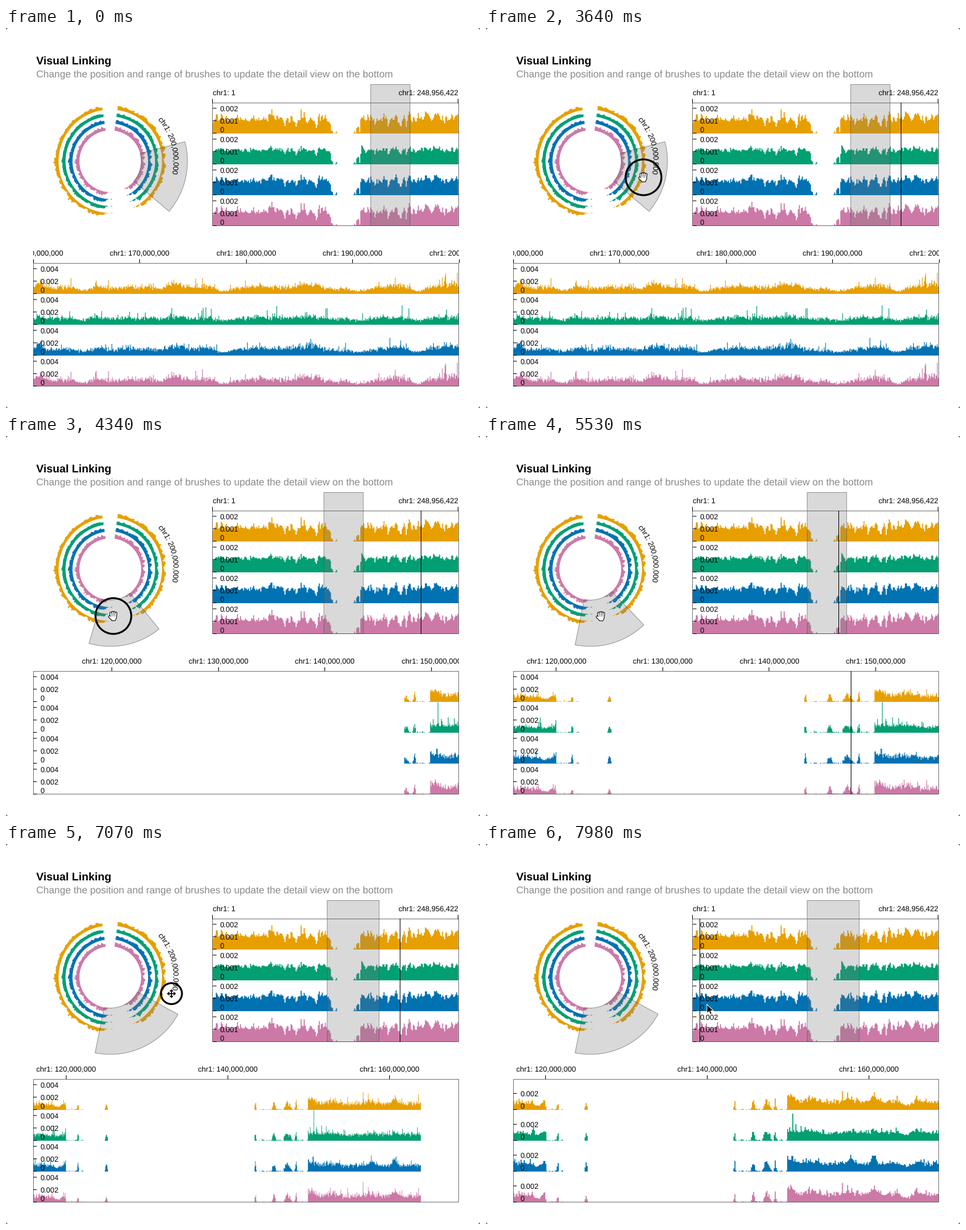
These frames come from a looping animation (768x616 px, 8000 ms). A matplotlib script:

```python
import numpy as np
import matplotlib as mpl
import matplotlib.pyplot as plt
from matplotlib.animation import FuncAnimation
from matplotlib.patches import Circle, PathPatch, Polygon, Rectangle
from matplotlib.path import Path
from matplotlib.textpath import TextPath
from matplotlib.transforms import Affine2D

W, H = 768, 616
LOOP, STEP, TICK = 8000, 40, 70      # ms; the picture changes on TICK
PX = 0.72                            # points per pixel at 100 dpi
FONT = "Liberation Sans"
COLORS = ["#E79F00", "#029F73", "#0072B2", "#CC79A7"]
GENOME = 248.956                     # Mb
BIN = 0.064                          # Mb per fine bin
CX, CY = 169, 216                    # circular view
OX, OW = 335, 398                    # overview
DX, DW = 44, 690                     # detail view

mpl.rcParams.update({"text.hinting": "none", "path.snap": False,
                     "path.simplify": False})
fig = plt.figure(figsize=(W / 100, H / 100), dpi=100, facecolor="white")
ax = fig.add_axes([0, 0, 1, 1])
ax.set_xlim(0, W)
ax.set_ylim(H, 0)
ax.axis("off")


# ---- signal ----
VALLEYS = [(73, .8), (84.5, .8), (105, 1.5), (119, .7), (164.7, .9),
           (177.6, .9), (190, 1.8), (196, .8)]          # center, width
PEAKS = [(89.6, .45), (160.6, .3), (198.7, .12)]
ISLANDS = [(121.5, .1), (125, .13), (143.4, .1), (145.7, .2), (147.4, .4),
           (148.4, .12)]


def bump(x, center, width):
    return np.exp(-((x - center) / width) ** 2)


def make_signal():
    """Four tracks of fine bins, in thousandths."""
    rng = np.random.default_rng(5)
    n = 244 * 16
    pos = (np.arange(n) + .5) * BIN
    env = 1.2 * np.interp(pos, np.arange(245) * 1.024,
                          rng.lognormal(0, .2, 245))
    for c, w in VALLEYS:
        env *= 1 - .6 * bump(pos, c, w)
    for c, w in PEAKS:
        env *= 1 + .9 * bump(pos, c, w)

    # centromere: empty but for a few islands and sparse specks
    gap = (pos > 120) & (pos < 149.9)
    specks = (rng.random(n) < .4) & ((pos < 122.2) | (pos > 143.9))
    env[gap] = np.where(specks, .12, 0)[gap]
    for c, w in ISLANDS:
        env += 1.2 * bump(pos, c, w) * (abs(pos - c) < 1.3 * w)
    env[pos > GENOME] = 0

    def track(power, scale, rate, amp):
        jitter = np.clip(1 + .18 * rng.standard_normal(n), .6, 1.5)
        spikes = 1 + (rng.random(n) < rate) * rng.exponential(amp, n)
        level = np.where(env > .3, env ** power, env)
        return level * scale * jitter * spikes

    gold = track(1, .95, .2, .3)
    green = track(.5, 1, .12, .5)
    blue = track(.8, 1.02, .15, .25)
    pink = gold * (1.02 + .1 * rng.standard_normal(n))
    return np.array([gold, green, blue, pink])


FINE = make_signal()
COARSE = FINE.reshape(4, -1, 2).mean(2)
WIDE = FINE.reshape(4, -1, 16).mean(2)


# ---- helpers ----
def text(x, y, s, size=12, color="black", **kw):
    return ax.text(x, y, s, fontsize=size * PX, color=color, family=FONT,
                   va="baseline", zorder=4, **kw)


def line(xs, ys, z=3):
    return ax.plot(xs, ys, color="black", lw=PX, zorder=z,
                   solid_capstyle="butt")[0]


def pixel(x):
    return np.floor(x) + .5


def polar(mb, r):
    a = np.radians(8.5 + 1.381 * np.asarray(mb))
    return np.c_[CX - r * np.sin(a), CY - r * np.cos(a)]


def overview_x(mb):
    return OX + mb / GENOME * OW


def steps(edges, heights):
    """Corners of a bar profile, closed along the base."""
    return np.repeat(edges, 2), np.r_[0, np.repeat(heights, 2), 0]


def frame(x, y, w, h):
    ax.add_patch(Rectangle((x, y), w, h, fill=False, ec="#555555",
                           lw=.8 * PX, zorder=2))


def y_axis(x, bases, unit, values):
    """Ticks and labels for every track; unit is pixels per 0.001."""
    made = []
    for base in bases:
        for v in values:
            y = base - .5 - v * unit
            made.append(line([x, x + 6], [y, y]))
            made.append(text(x + 12, y + (4.3 if v else -1.2),
                             f"{v / 1000:g}"))
    return made


# ---- static parts ----
text(49, 58, "Visual Linking", 18, weight="bold")
text(49, 80, "Change the position and range of brushes to update "
     "the detail view on the bottom", 16, "#888888")

for sx in (0, W):
    for sy in (0, H):
        ax.add_patch(Polygon([(sx, sy), (abs(sx - 3), sy), (sx, abs(sy - 3))],
                             fc="#777777", lw=0))

wide_edges = np.minimum(np.arange(WIDE.shape[1] + 1) * 1.024, GENOME)
for k, color in enumerate(COLORS):
    x, y = steps(wide_edges, WIDE[k])
    top = np.minimum(y * 20.4, 49)
    ax.add_patch(Polygon(np.c_[overview_x(x), 171 + 50 * k - top],
                         fc=color, lw=0, zorder=1))
    base = 50 + 11.25 * (3 - k)
    ring = np.r_[polar(x, base + y * 4.6), polar(x[::-1], base)]
    ax.add_patch(Polygon(ring, fc=color, lw=0, zorder=1))

frame(OX - .5, 121.5, OW + 1, 199)
frame(DX + .5, 381.5, DW - 1, 199)
for x in (OX - .5, OX + OW - .5):
    line([x, x], [115, 122])
text(OX, 109, "chr1: 1")
text(OX + OW, 109, "chr1: 248,956,422", ha="right")
y_axis(OX, range(171, 322, 50), 20.2, (2, 1, 0))

glyphs = TextPath((0, 0), "chr1: 200,000,000", size=12, prop={"family": FONT})
gx, gy = glyphs.vertices.T
ga = np.radians(75.2) + (gx - gx.max() / 2) / 105
gr = 102.5 + gy
ax.add_patch(PathPatch(Path(np.c_[CX + gr * np.sin(ga), CY - gr * np.cos(ga)],
                            glyphs.codes), fc="black", lw=0, zorder=4))

# ---- moving parts ----
plot_clip = Rectangle((DX, 581), DW, -200, transform=ax.transData)
label_clip = Rectangle((DX, 381), DW, -30, transform=ax.transData)


def blank():
    return [(0, 0), (0, 1), (1, 1)]


bars = []
for color in COLORS:
    p = ax.add_patch(Polygon(blank(), fc=color, lw=0, zorder=1))
    p.set_clip_path(plot_clip)
    bars.append(p)

fine_axis = y_axis(DX, range(431, 582, 50), 10.1, (4, 2, 0))
coarse_axis = y_axis(DX, range(431, 582, 50), 13.1, (2, 0))

ticks = []
for _ in range(6):
    label = text(0, 369, "", ha="center", clip_on=True)
    label.set_clip_path(label_clip)
    ticks.append((label, line([0, 0], [375, 381])))

brush_style = dict(fc=(.467, .467, .467, .28), ec=(.3, .3, .3, .6),
                   lw=.9 * PX, zorder=3.5)
arc_brush = ax.add_patch(Polygon(blank(), **brush_style))
box_brush = ax.add_patch(Rectangle((0, 91.5), 1, 229, **brush_style))
top_line = line([0, 0], [121, 321], z=5)
low_line = line([0, 0], [381, 581], z=5)
click = ax.add_patch(Circle((0, 0), 29, fill=False, ec="black", lw=3 * PX,
                            zorder=6))

shift = Affine2D()


def shape(strokes, **kw):
    """A pointer part made of polylines, moved by the shared shift."""
    path = Path.make_compound_path(*[Path(s) for s in strokes])
    return ax.add_patch(PathPatch(path, transform=shift + ax.transData,
                                  capstyle="round", joinstyle="round", **kw))


def stroked(strokes, layers):
    return [shape(strokes, fill=False, ec=c, lw=w * PX, zorder=z)
            for c, w, z in layers]


arrow = [(0, 0), (0, 14.5), (3.4, 11.4), (5.6, 16.4), (8, 15.3),
         (5.9, 10.5), (10.4, 10.2), (0, 0)]
palm = [(-3.4, 1), (4.4, 1), (4.2, 4), (2.6, 7), (-2, 7), (-3.8, 4), (-3.4, 1)]
fingers = [[(2.3 * i, 2), (2.9 * i, abs(i) - 6.5)]
           for i in (-1.5, -.5, .5, 1.5)] + [[(-2.4, 5), (-6.5, 1)]]
cross = []
for ux, uy in ((1, 0), (-1, 0), (0, 1), (0, -1)):
    cross.append([(0, 0), (6 * ux, 6 * uy)])
    cross.append([(4 * ux - 2 * uy, 4 * uy - 2 * ux), (6 * ux, 6 * uy),
                  (4 * ux + 2 * uy, 4 * uy + 2 * ux)])

POINTERS = {
    "arrow": [shape([arrow], fc="black", ec="white", lw=PX, zorder=7)],
    "hand": [shape([palm], fc="white", ec="black", lw=2 * PX, zorder=7)]
    + stroked(fingers, [("black", 4, 7), ("white", 2, 8)])
    + [shape([palm], fc="white", ec="none", lw=0, zorder=8)],
    "move": stroked(cross, [("white", 4, 7), ("black", 1.6, 8)]),
}


# ---- timeline ----
def ramp(t, t0, t1):
    """Smooth step from 0 to 1."""
    u = np.clip((t - t0) / (t1 - t0), 0, 1)
    return u * u * (3 - 2 * u)


def glide(t, t0, t1, a, b):
    return np.array(a) + ramp(t, t0, t1) * np.subtract(b, a)


def pointer(t):
    """Pointer position; while brushing it turns about the circle."""
    if t < 2310:
        return glide(t, 770, 2100, (312, 625), (269, 236))
    if t < 3430:
        return glide(t, 2310, 3080, (269, 236), (255, 242))
    if t > 7070:
        return glide(t, 7070, 7980, (268, 243), (358, 260))
    drag, leave, widen = (ramp(t, 3640, 4270), ramp(t, 5460, 5810),
                          ramp(t, 6650, 7070))
    mb = (177.2 - 50.3 * drag + 4 * ramp(t, 4830, 5250) + 25 * leave
          + 22.6 * widen)
    return polar(mb, 90 - 14 * drag + 21 * leave + 5.6 * widen)[0]


def domain(t):
    """Start and length of the brushed range, in Mb."""
    start = 160 - 47.4 * ramp(t, 3640, 4270) + 3.35 * ramp(t, 4830, 5250)
    return start, 40 + 12.6 * ramp(t, 6650, 7070) + .15 * ramp(t, 7070, 7490)


def pointer_kind(t):
    if t < 840:
        return None
    if t < 2940 or t >= 7490:
        return "arrow"
    return "hand" if t < 6090 else "move"


def click_radius(t):
    if 3430 <= t < 5530:
        return 29
    return 29 - 12 * max(0, t - 7000) / TICK if 6580 <= t < 7150 else 0


def hover(t, x, y, start, span):
    """Genomic position of the hover line, or None."""
    if t < 2940:
        if t >= 840 and 381 < y < 581:
            return start + (x - DX) / DW * span
        return None
    if t < 5530:
        return 210.8
    if t < 6090:
        return 147.7 + 8.8 * ramp(t, 5530, 5810)
    if t < 7560:
        return 189.6
    return max(x - 12 - OX, 0) / OW * GENOME


def loaded(t):
    """Range of data tiles that have arrived, in Mb."""
    tile = 256 * BIN
    if t < 4550:
        return 9 * tile, 13 * tile
    return (6 * tile, 10 * tile) if t < 7560 else (0, GENOME)


def draw_detail(t, start, span):
    coarse = t >= 7560
    data, size, unit = ((COARSE, 2 * BIN, 13.1) if coarse
                        else (FINE, BIN, 10.1))
    lo, hi = loaded(t)
    i = int(np.floor(max(lo, start) / size + 1e-6))
    j = int(np.ceil(min(hi, start + span) / size - 1e-6))
    edges = DX + (np.arange(i, j + 1) * size - start) / span * DW
    for k, bar in enumerate(bars):
        x, y = steps(edges, data[k, i:j])
        bar.set_xy(np.c_[x, 431 + 50 * k - np.minimum(y * unit, 49.5)])
    for a in fine_axis:
        a.set_visible(not coarse)
    for a in coarse_axis:
        a.set_visible(coarse)

    step = 10 if span < 50 else 20
    first = int(start // step) * step
    for n, (label, mark) in enumerate(ticks):
        mb = first + n * step
        x = DX + (mb - start) / span * DW
        label.set_position((x, 369))
        label.set_text(f"chr1: {mb},000,000")
        mark.set_xdata([pixel(x)] * 2)
        for a in (label, mark):
            a.set_visible(DX - 1 < x < DX + DW + 1)


def draw_brushes(start, end):
    mb = np.linspace(start, end, 60)
    arc_brush.set_xy(np.r_[polar(mb, 125), polar(mb[::-1], 50)])
    x = overview_x(start)
    box_brush.set_x(x)
    box_brush.set_width(overview_x(end) - x)


def draw_lines(mb, start, span):
    top_line.set_visible(mb is not None)
    low_line.set_visible(mb is not None and start <= mb <= start + span)
    if mb is not None:
        top_line.set_xdata([pixel(overview_x(mb))] * 2)
        low_line.set_xdata([pixel(DX + (mb - start) / span * DW)] * 2)


def update(i):
    t = (i * STEP + 30) // TICK * TICK
    x, y = pointer(t)
    start, span = domain(t)
    draw_detail(t, start, span)
    draw_brushes(start, start + span)
    draw_lines(hover(t, x, y, start, span), start, span)

    radius = click_radius(t)
    click.set_visible(radius > 0)
    click.set_radius(radius)
    click.center = x, y
    shift.clear().translate(x, y)
    kind = pointer_kind(t)
    for name, parts in POINTERS.items():
        for p in parts:
            p.set_visible(name == kind)
    return []


anim = FuncAnimation(fig, update, frames=LOOP // STEP, interval=STEP,
                     init_func=lambda: [], repeat=True, repeat_delay=0)
plt.show()
```
